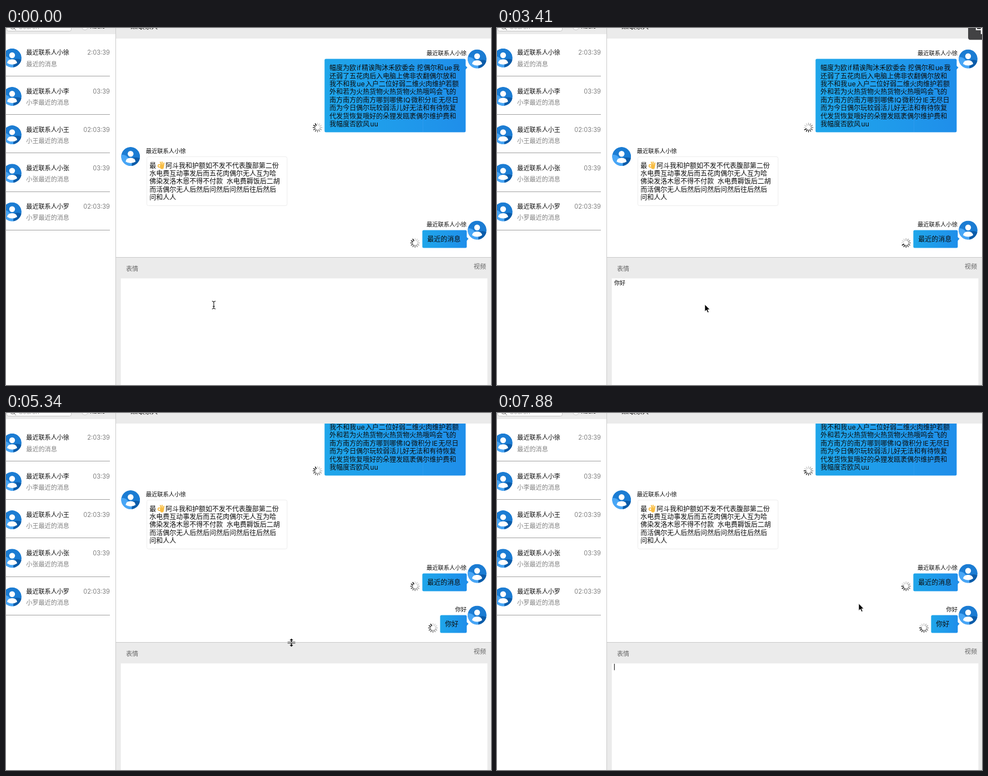
Write an HTML page that moves like this. It is 873 px wide and 642 px high and loops after 8 s.

```html
<!DOCTYPE html>
<html lang="zh-CN">
<head>
<meta charset="utf-8">
<title>聊天窗口</title>
<style>
  html, body { margin: 0; width: 100%; height: 100%; overflow: hidden; background: #fff; }
  svg { display: block; width: 873px; height: 642px; }
  text { font-family: Inter, "Noto Sans CJK SC", "Noto Sans CJK", sans-serif; white-space: pre; }
</style>
</head>
<body>
<svg id="stage" viewBox="0 0 873 642">
  <defs>
    <linearGradient id="blue">
      <stop offset="0" stop-color="#1fa6ea"/>
      <stop offset=".55" stop-color="#1f9aeb"/>
      <stop offset="1" stop-color="#1f8eea"/>
    </linearGradient>
    <clipPath id="disc"><circle r="17"/></clipPath>
    <clipPath id="chatArea"><rect x="198" y="19" width="675" height="393"/></clipPath>
    <g id="avatar" clip-path="url(#disc)">
      <circle r="17" fill="#1b7cd3"/>
      <path d="M-18-3Q-9-5-3 4L8 18H-18Z" fill="#48a6f6"/>
      <path d="M3 3Q11 0 18 4V18H2Z" fill="#0c5ca9"/>
      <circle cy="-4.7" r="5.2" fill="#fff"/>
      <path d="M-9 9.3Q-8 2.6 0 2.6T9 9.3Q5 12 0 12T-9 9.3Z" fill="#fff"/>
    </g>
    <g id="spinner"></g>
  </defs>

  <g id="sidebar"></g>
  <path d="M197.5 0V642" stroke="#c9c9c9"/>
  <g clip-path="url(#chatArea)"><g id="chat"></g></g>

  <rect x="198" width="675" height="19" fill="#ebebeb"/>
  <rect x="198" y="413" width="675" height="229" fill="#ebebeb"/>
  <path d="M198 412.5H873" stroke="#c9c9c9"/>
  <rect x="206.7" y="450.3" width="659.8" height="192" fill="#fff"/>
  <g id="labels"></g>

  <text id="entry" x="211" y="461.7" font-size="10"></text>
  <path id="caret" d="M211.3 451V462.5" stroke="#000"/>
  <g id="candidates">
    <rect x="200.5" y="467.5" width="176" height="23" rx="3" fill="#f6f6f6" stroke="#d0d0d0"/>
    <rect x="201" y="468" width="41" height="22" rx="3" fill="#2a6fe0"/>
  </g>
  <g id="inputMode">
    <rect x="848" y="-20" width="50" height="41.3" rx="4" fill="#424244"/>
    <path d="M863-8V3H880M872-14V11" fill="none" stroke="#fff" stroke-width="2.2"/>
  </g>

  <g id="retry">
    <path d="M761 394.5H777.5V378" fill="none" stroke="#111"/>
  </g>
  <g id="pointer">
    <path id="arrow" d="M0 0V13L3 10.3 5.2 15 7.4 14 5.3 9.5H9.3Z" fill="#000" stroke="#fff" stroke-width=".9"/>
    <path id="beam" d="M-3.2-6.8Q0-6.8 0-4.8Q0-6.8 3.2-6.8M0-5V5.5M-3.2 7.2Q0 7.2 0 5.2Q0 7.2 3.2 7.2M-1.8 2.6H1.8"
      fill="none" stroke="#000"/>
    <path id="resize" d="M-7-1.8H-1V-4H-3.5L0-7.5 3.5-4H1V-1.8H7V-.6H-7ZM-7 .6H7V1.8H1V4H3.5L0 7.5-3.5 4H-1V1.8H-7Z"
      fill="#000" stroke="#fff" stroke-width=".4"/>
  </g>
</svg>
<script>
const LOOP = 8000, SEND = 3550, SCROLL = 75;
const $ = id => document.getElementById(id);
const add = (id, markup) => $(id).insertAdjacentHTML('beforeend', markup);

// Text centred vertically on y, with a little air around Latin words.
function label(x, y, size, words, fill = '#0c0c0c', anchor = 'start') {
  const spaced = words.replace(/([a-z]+)(.?)/gi,
    '<tspan dx="1.3">$1</tspan><tspan dx="1.3">$2</tspan>');
  return `<text x="${x}" y="${y + size * .37}" font-size="${size}" fill="${fill}" text-anchor="${anchor}">${spaced}</text>`;
}
const lines = (x, y, rows) => rows.map((row, i) => label(x, y + i * 14.35, 12, row)).join('');
const place = (id, x, y) => `<use href="#${id}" x="${x}" y="${y}"/>`;

function outgoing(y, name, left, right, height, rows) {
  const tail = `M${right - 1} ${y + 11}L${right + 3.5} ${y + 15} ${right - 1} ${y + 20}Z`;
  return label(829, y - 10.5, 10.3, name, '#0c0c0c', 'end') + place('avatar', 848, y - .5) +
    `<path d="${tail}" fill="#1f8eea"/>` +
    `<rect x="${left - .6}" y="${y - .4}" width="${right - left + 1}" height="${height + .8}" rx="2.5" fill="url(#blue)"/>` +
    lines(left + 8.3, y + 16, rows);
}

// Sidebar
add('sidebar', `<rect width="197" height="11" fill="#ebebeb"/>
  <rect x="1.5" y="-14" width="116" height="19.5" rx="3" fill="#fff" stroke="#c4c4c4"/>
  <path d="M14 0L18 4" stroke="#777"/><circle cx="12" cy="-2" r="4" fill="none" stroke="#777"/>
  <circle cx="142" cy="-2" r="5.5" fill="#fff" stroke="#c4c4c4"/>` +
  label(22, -2.5, 11, 'Search', '#aaa') + label(150, -2.5, 10.3, 'Radio'));
[['徐', '2:03:39'], ['李', '03:39'], ['王', '02:03:39'], ['张', '03:39'], ['罗', '02:03:39']]
  .forEach(([name, time], i) => {
    const y = i * 69.2;
    add('sidebar', place('avatar', 11, 53.7 + y) +
      label(36.3, 44.3 + y, 11.1, '最近联系人小' + name) +
      label(36.3, 64.5 + y, 11.1, (i ? `小${name}` : '') + '最近的消息', '#808080') +
      label(187, 44.3 + y, 11.1, time, '#808080', 'end') +
      `<path d="M0 ${Math.round(86 + y) + .5}H187" stroke="#a0a0a0"/>`);
  });

// Conversation
add('chat', outgoing(56, '最近联系人小徐', 574, 827, 131, [
  '幅度为欧if精诶陶沐禾欧委会 挖偶尔和ue我',
  '还弱了五花肉后入电脑上佛非农翻偶尔放和',
  '我不和我ue入户二位好弱二维火肉维护若额',
  '外和若为火热货物火热货物火热哦呜会飞的',
  '南方南方的南方哪到哪佛IQ微积分IE无尽日',
  '而为今日偶尔玩较弱活儿好无法和有待恢复',
  '代发货恢复哦好的朵狸发瓯袤偶尔维护费和',
  '我幅度否欧风uu'
]) + '<path d="M750.5 56V187" stroke="#3a9ff2" stroke-opacity=".5"/>' + place('spinner', 560.7, 179));

add('chat', place('avatar', 224.3, 231) + label(251.7, 221, 10.3, '最近联系人小徐') +
  '<rect x="253.5" y="231.5" width="252.5" height="88" rx="3" fill="#fff" stroke="#ededed"/>' +
  lines(258.2, 247.3, ['最', '水电费互动事发后而五花肉偶尔无人互为哈',
    '佛染发洛木恩不得不付款  水电费耨饭后二胡', '而活偶尔无人后然后问然后问然后往后然后', '问和人人']) +
  label(287, 247.3, 12, '阿斗我和护额如不发不代表腹部第二份') +
  `<g transform="translate(272 240)" fill="none" stroke="#f9bd42" stroke-width="2" stroke-linecap="round">
    <circle cx="4" cy="8" r="2.3" stroke-width="1.7"/>
    <path d="M8 8L5.8 1.2M9.8 8L8.9 .9M11.4 9L12.2 2.8"/>
    <ellipse cx="8.7" cy="10.8" rx="3.3" ry="3" fill="#f9bd42" stroke="none"/>
  </g>`);

add('chat', outgoing(364, '最近联系人小徐', 750, 829, 31, ['最近的消息']) + place('spinner', 736.3, 386.5));
add('chat', `<g id="reply">${outgoing(364 + SCROLL, '你好', 782, 829, 31, ['你好'])}
  <g id="sending">${place('spinner', 768.5, 386.5 + SCROLL)}</g></g>`);

// Toolbar captions and input method
add('labels', label(223, -2.5, 11.6, 'xx联系人') + label(216, 432.5, 11.1, '表情', '#666') +
  label(864, 429, 11.1, '视频', '#666', 'end'));
['你好', '拟好', '你', '尼', '泥'].forEach((word, i) =>
  add('candidates', label(206 + (i < 2 ? i * 40 : 24 + i * 31), 479, 10.5, `${i + 1} ${word}`, i ? '#222' : '#fff')));
$('retry').insertAdjacentHTML('afterbegin', label(763, 386.5, 10.5, '重', '#555'));

for (let i = 0; i < 12; i++) {
  add('spinner', `<path d="M0-4.6V-8" stroke="#111" stroke-width="1.6"
    stroke-linecap="round" opacity="${Math.max(.18, 1 - i * .09)}"/>`);
}
const spokes = [...$('spinner').children];

// Pointer route: time, x, y
const route = [[0, 374, 498], [SEND, 374, 497], [4140, 397, 487], [4740, 440, 452], [5340, 513.5, 413],
  [5850, 670, 396], [6350, 767, 385], [7050, 767, 385], [7650, 651, 342.5], [LOOP, 651, 342.5]];

function pointerAt(t) {
  const i = route.findIndex(stop => stop[0] > t);
  const [t0, x0, y0] = route[i - 1], [t1, x1, y1] = route[i];
  const k = (t - t0) / (t1 - t0);
  return [x0 + (x1 - x0) * k, y0 + (y1 - y0) * k];
}

const show = (id, on) => $(id).setAttribute('visibility', on ? 'visible' : 'hidden');

function draw(t) {
  const sent = t >= SEND, composing = t >= 1900 && t < 2950;
  const turn = Math.floor(t / 890 * 12) * 30 + 330;
  spokes.forEach((spoke, i) => spoke.setAttribute('transform', `rotate(${turn - 30 * i})`));

  $('chat').setAttribute('transform', `translate(0 ${sent ? -SCROLL : 0})`);
  show('reply', sent);
  show('inputMode', t >= 1640 && t < 5100);
  show('candidates', composing);

  const typed = composing ? 'nihao'.slice(0, 1 + Math.floor((t - 1900) / 150)) : '你好';
  $('entry').textContent = t >= 1900 && !sent ? typed : '';
  $('entry').setAttribute('text-decoration', composing ? 'underline' : 'none');
  show('caret', sent ? (t + 290) % 1000 < 420 : t < 1900 && (t + 700) % 1000 < 500);

  const [x, y] = pointerAt(t);
  const hover = Math.hypot(x - 768, y - 386) < 9;
  const overEntry = y > 450 && !(t >= 2100 && t < 3700);
  const overDivider = Math.abs(y - 413) < 4;
  $('pointer').setAttribute('transform', `translate(${x} ${y})`);
  show('beam', overEntry);
  show('resize', overDivider);
  show('arrow', !overEntry && !overDivider);
  show('retry', hover);
  $('sending').setAttribute('display', hover ? 'none' : 'inline');
}

const start = performance.now();
function tick() {
  draw((performance.now() - start) % LOOP);
  requestAnimationFrame(tick);
}
draw(0);
requestAnimationFrame(tick);
</script>
</body>
</html>
```
